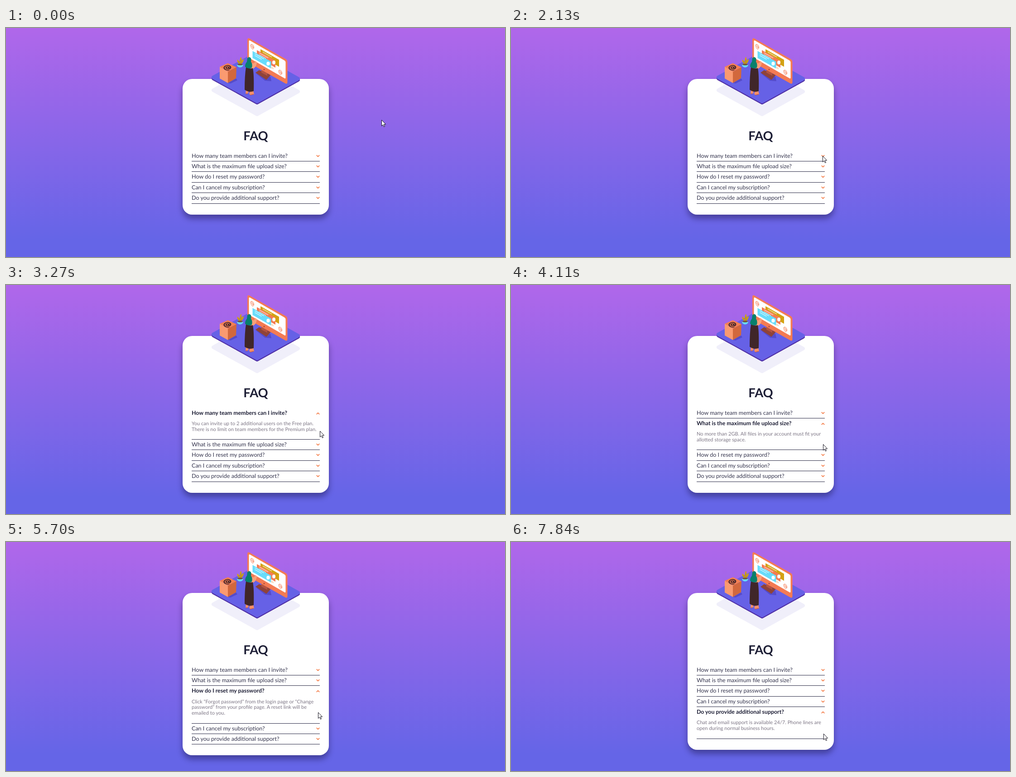
An HTML page that plays this animation: 1102 px wide and 508 px high, repeating every 8 s.

```html
<!DOCTYPE html>
<html lang="en">
<head>
<meta charset="utf-8">
<title>FAQ accordion</title>
<style>
html, body { margin: 0; width: 100%; height: 100%; overflow: hidden; }
body {
  position: relative;
  background: #6565e7 linear-gradient(#b067ea, #6565e7 470px) no-repeat;
  font-family: Lato, "Open Sans", sans-serif;
  text-rendering: geometricPrecision;
  color: #1d1e35;
}
.card {
  position: absolute; left: 390px; top: 113px; width: 283px;
  padding: 159.7px 20px 24px;
  border-radius: 21px;
  background: #fff;
  box-shadow: 0 9px 13px rgba(10, 5, 40, .38);
}
h1 {
  position: absolute; left: 0; top: 110px; width: 100%; margin: 0;
  font-size: 27.4px; line-height: 32px; text-align: center;
}
.row { position: relative; height: 22.4px; border-bottom: 1px solid #2c2c48; white-space: nowrap; }
.title { font-size: 12.55px; line-height: 21.5px; color: #33334c; }
.answer { display: none; margin: 7.6px 0 0; font-size: 11.1px; line-height: 12.9px; color: #7d7685; }
.chevron {
  position: absolute; right: 0; top: 8px; width: 8px; height: 6px;
  fill: none; stroke: #f47b46; stroke-width: 1.7;
}
.open { height: auto; padding-bottom: 14.4px; }
.open .title { font-size: 12.33px; font-weight: 700; color: #1d1e35; }
.open .answer { display: block; }
.open .chevron { transform: rotate(180deg); top: 9px; }
.art, .cursor { position: absolute; left: 0; top: 0; }
</style>
</head>
<body>
<main class="card">
  <h1>FAQ</h1>
  <div id="list"></div>
</main>

<svg class="art" width="1102" height="210">
  <defs>
    <path id="tile" d="M458 109.5 554.5 163 645 112.5 549 59Z" stroke-width="8" stroke-linejoin="round"/>
    <g id="at" fill="none">
      <circle r="1.7"/>
      <path d="M1.8-1.8V1.2Q2.2 2.3 3.4 1.5Q5-1.8 2.5-3.7A4.4 4.4 0 1 0 2.4 3.9"/>
    </g>
    <g id="message">
      <path d="M0 0 41 23.5V39L0 15.5Z"/>
      <path d="M5 6 25 17.5M5 10 20 18.6" stroke="#fff" stroke-width="1.1" opacity=".85"/>
    </g>
  </defs>

  <use href="#tile" y="28.5" fill="#f0effa" stroke="#f0effa"/>
  <use href="#tile" y="2.4" fill="#4f2fa5" stroke="#4f2fa5"/>
  <use href="#tile" fill="#6661e6" stroke="#6661e6"/>

  <!-- box -->
  <path d="M490 122 508 112 511 116 496 123Z" fill="#554bc9"/>
  <path d="M472 86 490 78 509 87 490 97Z" fill="#f47f53"/>
  <path d="M472 86 490 97V122L472 112Z" fill="#fa9a70"/>
  <path d="M490 97 509 87 508 111.5 490 122Z" fill="#d2683d"/>
  <use href="#at" transform="translate(489 88.2) scale(1.75 1.15)" stroke="#40242a" stroke-width="1.5"/>

  <!-- plant -->
  <path d="M516 81Q509 75 511 70Q516 73 517 79Q515 68 519 64Q522 70 518 79Q520 70 525 69Q525 76 518 81Z" fill="#d0a114"/>
  <path d="M515 80 514 74M517.5 80 518.5 70M519 80 521 74" stroke="#8d6b1c" stroke-width=".5"/>
  <path d="M510.5 81V84.5Q517 90.5 523.5 84.5V81Z" fill="#66daf7"/>
  <ellipse cx="517" cy="81" rx="6" ry="1.8" fill="#72513a"/>

  <!-- monitor -->
  <path d="M551 100 572 117 586 118 584 108Z" fill="#544bca"/>
  <path d="M551 99 559 93.5 585 104 575 115Z" fill="#8f4339"/>
  <path d="M564 87 577 94V106L564 99Z" fill="#b35341"/>
  <path d="M533 27Q533 21 538 23.5L618 69Q621.5 71 621.5 76V121Q621 125 617 123L536 77Q533 75 533 72Z" fill="#f47b53"/>
  <path d="M536.5 29Q536.5 26.5 539 28L615 72Q617.5 73.5 617.5 76V110Q617.5 113 615 111.5L539 67.5Q536.5 66 536.5 63Z" fill="#fff"/>
  <circle cx="570" cy="92" r="1.5" fill="#a84a3a"/>
  <g stroke="#f47b53" stroke-width="1">
    <use href="#at" transform="matrix(.9 .52 0 1.05 544 41.5)"/>
    <use href="#at" transform="matrix(.9 .52 0 1.05 606 98.5)"/>
  </g>
  <use href="#message" x="562" y="47" fill="#d4a112"/>
  <use href="#message" x="554" y="49" fill="#f47b53"/>
  <use href="#message" x="544.5" y="51" fill="#68dcfb"/>
  <g fill="#fff">
    <ellipse cx="579" cy="79" rx="3.7" ry="4.3"/>
    <ellipse cx="591.5" cy="76.5" rx="3.5" ry="4.2"/>
    <path d="M585 85 591 88V92L585 89Z" fill="#f9ddc5"/>
  </g>

  <!-- woman -->
  <path d="M530 136 536 138 535 145 529 146ZM540 138 546 139 548 147 540 149 537 146Z" fill="#f58f69"/>
  <path d="M529 146H534M539 149 547 147" stroke="#bd5139" stroke-width="1.2"/>
  <path d="M539 76Q548 82 551 73L554 76Q553 87 546 90L540 90Z" fill="#f8a179"/>
  <path d="M530 87Q537 91 545 89Q548 102 547 140Q537 144 527 137Q527 105 530 87Z" fill="#402629"/>
  <path d="M533 67Q537 62 541 67Q542 71 541 75Q545 80 543 88Q536 92 528 86Q528 79 532 75Z" fill="#07806c"/>
</svg>

<svg class="cursor" id="cursor" width="14" height="20" overflow="visible">
  <path d="M.5 .5V13.8L3.5 11 5.5 15.7 7.5 14.8 5.5 10.2H9.6Z" fill="#fff" stroke="#15131f" stroke-width="1"/>
</svg>

<script>
const LOOP = 8000;
const STEP = 142; // pointer sampling interval, ms

const questions = [
  ["How many team members can I invite?",
   "You can invite up to 2 additional users on the Free plan.<br>There is no limit on team members for the Premium plan."],
  ["What is the maximum file upload size?",
   "No more than 2GB. All files in your account must fit your<br>allotted storage space."],
  ["How do I reset my password?",
   "Click “Forgot password” from the login page or “Change<br>password” from your profile page. A reset link will be<br>emailed to you."],
  ["Can I cancel my subscription?",
   "Yes! Send us a message and we’ll process your request no<br>questions asked."],
  ["Do you provide additional support?",
   "Chat and email support is available 24/7. Phone lines are<br>open during normal business hours."]
];
const openTimes = [2560, 4110, 5700, 6840, 7840];

// [sample index, x, y]
const path = [
  [0, 829, 203.5], [8, 789, 225], [15, 688, 283.5], [19, 688, 283.5],
  [23, 693, 323.5], [27, 689, 353], [30, 689, 353], [34, 689, 377.5],
  [40, 689, 377.5], [45, 689, 411], [48, 689, 411], [49, 690, 425], [57, 690, 425]
];

const list = document.getElementById("list");
const cursor = document.getElementById("cursor");

list.innerHTML = questions.map(([title, answer]) => `
  <div class="row">
    <div class="title">${title}</div>
    <svg class="chevron"><path d="M.8 1.2 4 4.4 7.2 1.2"/></svg>
    <p class="answer">${answer}</p>
  </div>`).join("");
const rows = [...list.children];

function pointerAt(sample) {
  const next = Math.max(1, path.findIndex(([s]) => s >= sample));
  const [s0, x0, y0] = path[next - 1];
  const [s1, x1, y1] = path[next];
  const k = (sample - s0) / (s1 - s0);
  return [x0 + (x1 - x0) * k, y0 + (y1 - y0) * k];
}

function render(t) {
  const opened = openTimes.filter(time => t >= time).length - 1;
  rows.forEach((row, i) => row.classList.toggle("open", i === opened));
  const [x, y] = pointerAt(Math.floor(t / STEP + 0.07));
  cursor.style.transform = `translate(${x}px, ${y}px)`;
}

const start = performance.now();
function tick() {
  render((performance.now() - start) % LOOP);
  requestAnimationFrame(tick);
}
tick();
</script>
</body>
</html>
```
